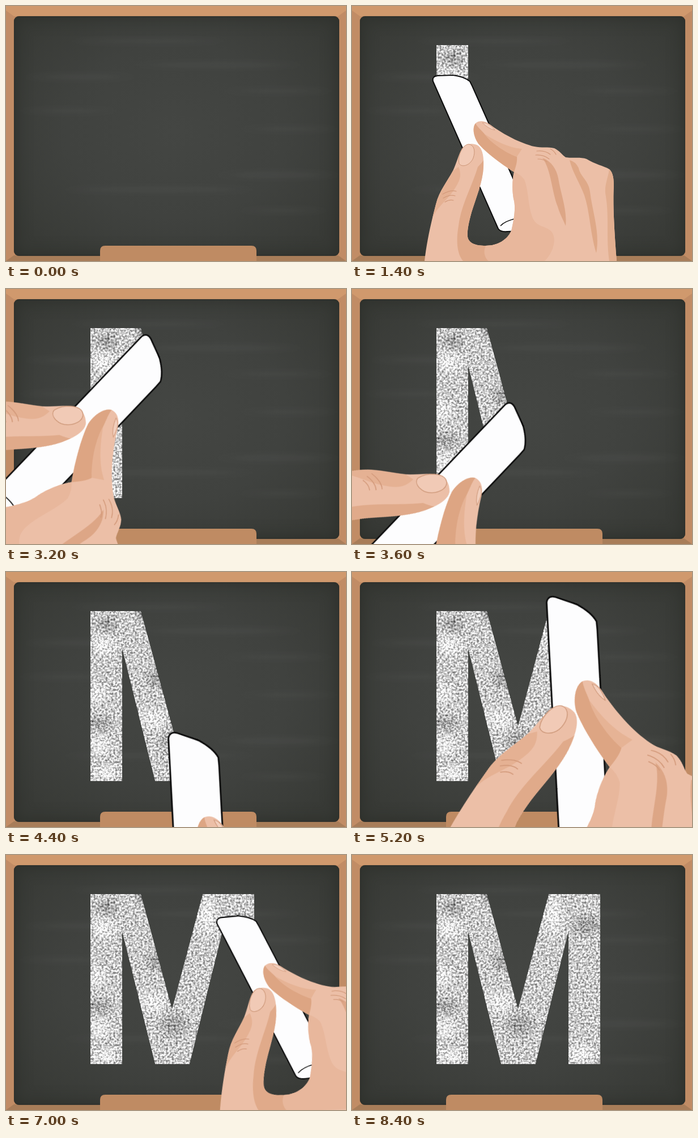
Animation of 600x450 px, one loop 8.6 s. Source, as an HTML page:

```html
<!DOCTYPE html>
<html lang="en">
<head>
<meta charset="utf-8">
<title>Chalk letter</title>
<style>
html, body { margin: 0; width: 100%; height: 100%; overflow: hidden; background: #c18c65; }
svg, .board { position: absolute; left: 0; top: 0; }
svg { width: 600px; height: 450px; }
.board {
  left: 14px; top: 18px; width: 574px; height: 423px; border-radius: 9px;
  background: radial-gradient(ellipse 62% 66% at 50% 48%, #444643, #40423f 55%, #383a36);
  box-shadow: inset 0 0 26px 4px rgba(36, 39, 34, .5), inset 0 0 3px #2b2d2a, 0 0 1px #6b523d;
}

.stroke, .hand { animation: 8.6s steps(5) infinite; }
.stroke.four, .hand.four { animation-timing-function: steps(6); }
.stroke.one { animation-name: draw1; }
.stroke.two { animation-name: draw2; }
.stroke.three { animation-name: draw3; }
.stroke.four { animation-name: draw4; }
.hand.one { animation-name: move1; }
.hand.two { animation-name: move2; }
.hand.three { animation-name: move3; }
.hand.four { animation-name: move4; }

@keyframes draw1 {
  0%, 13.95% { clip-path: inset(0 0 381px 0); }
  25.58%, 100% { clip-path: inset(0 0 81px 0); }
}
@keyframes draw2 {
  0%, 34.88% { clip-path: inset(0 0 381px 0); }
  46.51%, 100% { clip-path: inset(0 0 81px 0); }
}
@keyframes draw3 {
  0%, 48.83% { clip-path: inset(369px 0 0 0); }
  60.46%, 100% { clip-path: inset(69px 0 0 0); }
}
@keyframes draw4 {
  0%, 79.06% { clip-path: inset(0 0 381px 0); }
  93.02%, 100% { clip-path: inset(0 0 81px 0); }
}
@keyframes move1 {
  0%, 13.94% { visibility: hidden; }
  13.95% { visibility: visible; transform: translate(0, -60px); }
  25.58%, 100% { visibility: hidden; transform: translate(0, 240px); }
}
@keyframes move2 {
  0%, 34.87% { visibility: hidden; }
  34.88% { visibility: visible; transform: translate(-47px, -180px); }
  46.51%, 100% { visibility: hidden; transform: translate(31px, 120px); }
}
@keyframes move3 {
  0%, 48.82% { visibility: hidden; }
  48.83% { visibility: visible; transform: translate(-71px, 300px); }
  60.46% { visibility: visible; transform: translate(0, 0); }
  62.79%, 100% { visibility: hidden; transform: translate(0, 0); }
}
@keyframes move4 {
  0%, 79.05% { visibility: hidden; }
  79.06% { visibility: visible; transform: translate(0, -50px); }
  93.02%, 100% { visibility: hidden; transform: translate(0, 250px); }
}
</style>
</head>
<body>

<!-- wooden frame and shared definitions -->
<svg viewBox="0 0 600 450">
  <defs>
    <radialGradient id="light">
      <stop offset="0" stop-color="#aaa"/><stop offset="1" stop-color="#aaa" stop-opacity="0"/>
    </radialGradient>
    <radialGradient id="dark">
      <stop offset="0" stop-color="#505050"/><stop offset="1" stop-color="#505050" stop-opacity="0"/>
    </radialGradient>
    <pattern id="tone" width="600" height="450" patternUnits="userSpaceOnUse">
      <rect width="600" height="450" fill="#808080"/>
      <g fill="url(#light)">
        <ellipse cx="172" cy="130" rx="30" ry="26"/>
        <ellipse cx="160" cy="215" rx="26" ry="24"/>
        <ellipse cx="165" cy="306" rx="28" ry="24"/>
        <ellipse cx="176" cy="355" rx="30" ry="18"/>
        <ellipse cx="258" cy="260" rx="34" ry="28"/>
        <ellipse cx="355" cy="108" rx="26" ry="48"/>
        <ellipse cx="404" cy="350" rx="34" ry="24"/>
      </g>
      <g fill="url(#dark)">
        <ellipse cx="178" cy="92" rx="24" ry="22"/>
        <ellipse cx="166" cy="267" rx="30" ry="18"/>
        <ellipse cx="264" cy="188" rx="24" ry="24"/>
        <ellipse cx="296" cy="300" rx="34" ry="28"/>
        <ellipse cx="414" cy="124" rx="36" ry="26"/>
        <ellipse cx="240" cy="76" rx="14" ry="20"/>
      </g>
    </pattern>
    <filter id="chalk" filterUnits="userSpaceOnUse" x="140" y="60" width="310" height="320" color-interpolation-filters="sRGB">
      <feTurbulence type="fractalNoise" baseFrequency=".29" numOctaves="2" seed="7"/>
      <feColorMatrix values="0 0 0 1.2 .19  0 0 0 1.2 .19  0 0 0 1.2 .19  0 0 0 0 1"/>
      <feComposite in2="SourceGraphic" operator="arithmetic" k2="1" k3="1" k4="-.5"/>
      <feComposite in2="SourceAlpha" operator="in"/>
    </filter>
    <filter id="soft" x="-20%" y="-200%" width="140%" height="500%">
      <feGaussianBlur stdDeviation="18 4"/>
    </filter>

    <g id="art">
      <path d="M143 133Q141 124 151 123L178 122Q199 125 208 133L212 141L240 204L300 340L316 376Q300 398 274 398Q262 399 258 393Z"
            fill="#fdfdfe" stroke="#0c0c0c" stroke-width="2" stroke-linejoin="round"/>
      <path d="M262 388Q270 379 290 375" fill="none" stroke="#111" stroke-width="1.4"/>
      <!-- whole hand -->
      <path d="M128 450C132 415 140 380 148 350C154 326 168 310 178 291C185 276 188 262 194 252
        C200 243 212 241 222 246C231 252 233 268 232 284C231 310 219 338 211 364C206 382 203 396 204 407
        C206 419 218 423 236 423C258 423 274 412 281 397C285 380 290 356 285 340C282 322 283 306 286 293
        C262 278 236 258 223 243C214 230 212 214 218 207C225 201 234 203 242 208C266 226 296 242 322 248
        C334 251 346 248 357 251C366 255 371 263 377 267C390 269 404 266 414 270C428 279 444 282 454 288
        C461 294 462 306 462 318C460 350 463 400 467 450L500 850H60Z" fill="#ecbfa7"/>
      <!-- index finger shade -->
      <path d="M218 207C212 214 214 230 223 243C236 258 262 278 286 293C289 284 292 274 291 266
        C270 258 246 242 234 226C226 217 221 213 218 207Z" fill="#dda583"/>
      <path d="M234 226C246 242 270 258 291 266L300 252C274 250 250 236 234 226Z" fill="#e6b395"/>
      <path d="M230 206Q237 205 243 210Q250 216 252 219Q241 217 230 206Z" fill="#f2cfbd" stroke="#cf997b" stroke-width=".8"/>
      <!-- thumb shade -->
      <path d="M232 284C231 310 219 338 211 364C206 382 203 396 204 407C206 419 218 423 236 423
        C258 423 274 412 281 397C290 420 280 440 262 450H196C184 436 184 410 188 388C192 352 212 318 222 284Q230 276 232 272Z" fill="#e0aa8a"/>
      <path d="M178 291C168 310 154 326 148 350C146 358 144 366 142 374C152 352 170 342 184 318C192 305 193 296 188 284Z" fill="#e5b193"/>
      <path d="M189 278C186 263 196 244 206 244C216 245 218 257 214 268C209 281 194 286 189 278Z" fill="#f1cab6" stroke="#cc9677" stroke-width="1"/>
      <!-- palm and finger shades -->
      <path d="M285 340C290 356 285 380 281 397C274 412 258 423 236 423C230 436 236 448 244 452H338
        C356 436 362 410 352 398C340 386 326 392 318 372C310 350 312 326 304 306Q296 296 286 293C283 306 282 322 285 340Z" fill="#e8b79c"/>
      <path d="M336 268C352 290 352 326 363 354C367 368 373 378 377 388C380 360 368 330 364 304C361 288 352 274 336 268Z" fill="#dda686"/>
      <path d="M384 272C390 296 402 312 410 334C420 364 420 400 431 436C438 400 424 362 420 328C418 308 402 300 400 286Q394 274 384 272Z" fill="#dfa988"/>
      <path d="M454 288C461 294 462 306 462 318C460 350 463 400 467 450H454C448 410 454 372 448 336C444 318 452 304 454 288Z" fill="#e2af90"/>
      <path d="M160 332Q174 324 184 327M161 339Q173 332 182 335M164 346Q172 341 179 343M326 256Q340 254 350 262
        M324 263Q338 262 348 270M328 270Q338 270 344 275M350 252Q357 256 360 262" fill="none" stroke="#d39a7b" stroke-width="1.2" stroke-linecap="round"/>
    </g>
  </defs>
  <rect width="600" height="450" fill="#c18c65"/>
  <path d="M0 0H600V8L586 18H14L0 8Z" fill="#d0996d"/>
  <path d="M0 450L14 440H586L600 450Z" fill="#a87d59"/>
</svg>

<div class="board"></div>

<svg viewBox="0 0 600 450">
  <g fill="#fff" fill-opacity=".03" filter="url(#soft)">
    <ellipse cx="130" cy="125" rx="80" ry="5"/>
    <ellipse cx="375" cy="104" rx="130" ry="5"/>
    <ellipse cx="110" cy="185" rx="70" ry="4"/>
    <ellipse cx="480" cy="150" rx="80" ry="4"/>
    <ellipse cx="500" cy="217" rx="70" ry="4"/>
    <ellipse cx="480" cy="298" rx="90" ry="6"/>
    <ellipse cx="270" cy="324" rx="150" ry="5"/>
    <ellipse cx="490" cy="361" rx="60" ry="4"/>
    <ellipse cx="250" cy="62" rx="120" ry="4"/>
  </g>
  <path d="M166 450V432Q166 423 175 423H433Q442 423 442 432V450Z" fill="#bf8b63"/>
</svg>

<svg class="stroke one" viewBox="0 0 600 450">
  <path d="M149 69H205V369H149Z" fill="url(#tone)" filter="url(#chalk)"/>
</svg>
<svg class="stroke two" viewBox="0 0 600 450">
  <path d="M204 69H238L319.5 369H263L205 135L204 131Z" fill="url(#tone)" filter="url(#chalk)"/>
</svg>
<svg class="stroke three" viewBox="0 0 600 450">
  <path d="M293 272L347 69H383V131L382 135L324 369H267Z" fill="url(#tone)" filter="url(#chalk)"/>
</svg>
<svg class="stroke four" viewBox="0 0 600 450">
  <path d="M382 69H438V369H382Z" fill="url(#tone)" filter="url(#chalk)"/>
</svg>

<svg viewBox="0 0 600 450">
  <g class="hand one"><use href="#art"/></g>
  <g class="hand two"><use href="#art" transform="translate(284 204) rotate(67.5) scale(1.33) translate(-147 -124)"/></g>
  <g class="hand three"><use href="#art" transform="translate(346 47) rotate(20.8) scale(1.45) translate(-143 -128)"/></g>
  <g class="hand four"><use href="#art" transform="translate(372 114) rotate(-3.5) scale(1.065) translate(-143 -126)"/></g>
</svg>

</body>
</html>
```
